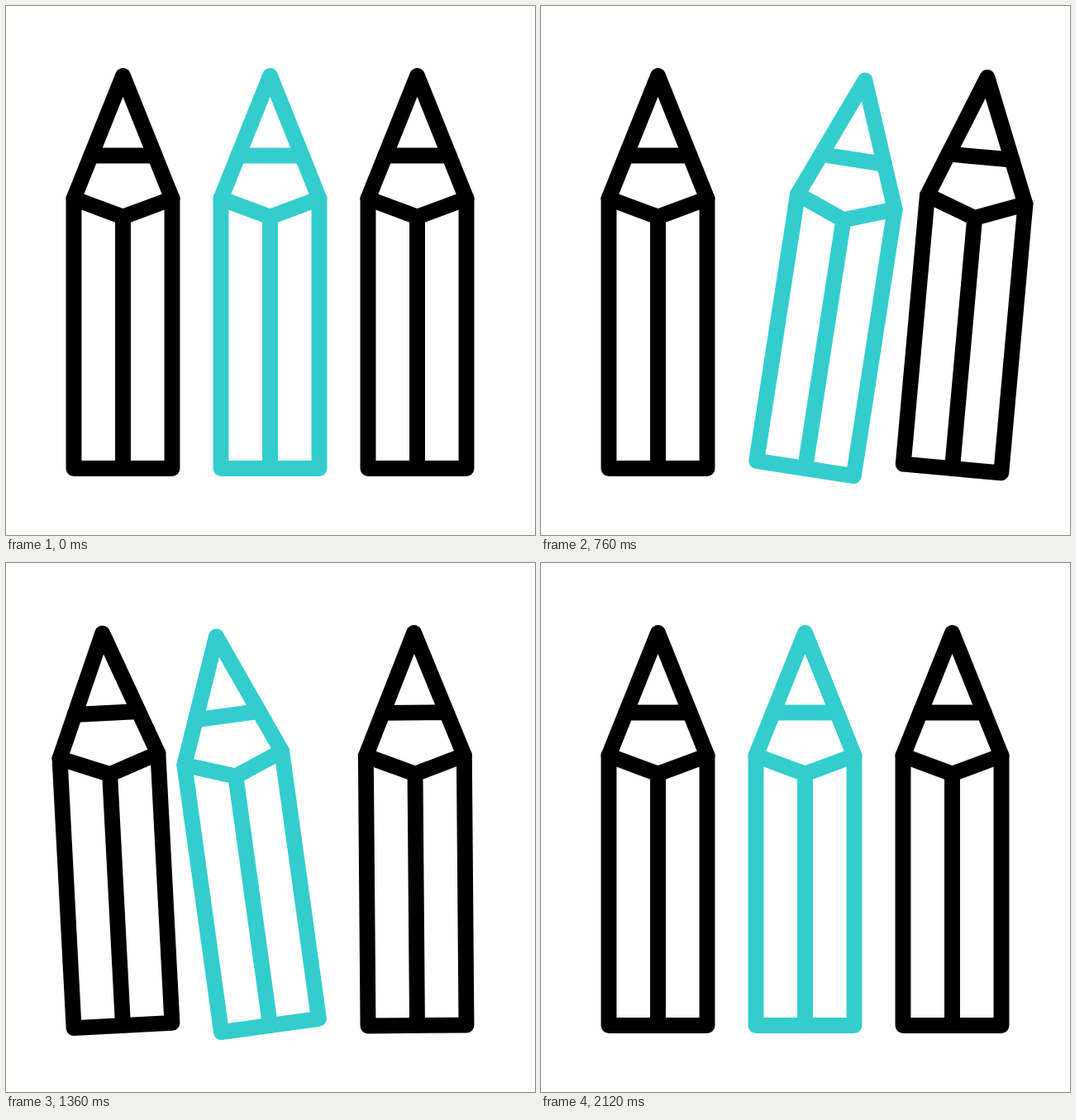
An HTML page for the animation above (2.28 s loop, 640x640 px).

```html
<!DOCTYPE html>
<html lang="en">
<head>
<meta charset="utf-8">
<title>Three pencils</title>
<style>
  html, body { margin: 0; width: 100%; height: 100%; overflow: hidden; background: #fff; }
  svg { display: block; width: 100%; height: 100%; }
</style>
</head>
<body>
<svg viewBox="0 0 640 640" fill="none" stroke-width="18.9" stroke-linecap="round" stroke-linejoin="round">
  <defs>
    <!-- The origin is the middle of the base, which is also the pivot. -->
    <g id="pencil">
      <path d="M-59.5 -326.5V0H59.5V-326.5L0 -475Z"/>
      <path d="M-59.5 -326.5L0 -304.3L59.5 -326.5M0 -304.3V0"/>
      <path d="M-38.7 -378.5H38.7"/>
    </g>
  </defs>
  <use id="left" href="#pencil" stroke="#000"/>
  <use id="middle" href="#pencil" stroke="#33cdcd"/>
  <use id="right" href="#pencil" stroke="#000"/>
</svg>
<script>
const STEP = 40;
const LOOP = 2280;
const BASE_Y = 559.5;
const CENTER_X = 319.5;
const SPACING = 178;

// Moments of the swing, in steps.
const hitRight = 5, turnRight = 18.2, hitLeft = 30, turnLeft = 42, clash = 47, rest = 53;
// Tilts in degrees: first contact, extra push, rebound.
const contact = 6.7, push = 3.2, rebound = 3.7;

// Constant-speed progress from 0 to 1 between two moments.
const ramp = (step, from, to) => Math.min(1, Math.max(0, (step - from) / (to - from)));

// Leans to a peak and back again.
const lean = (step, from, peak, to) => ramp(step, from, peak) - ramp(step, peak, to);

// The middle pencil swings fast until it hits a neighbour, then pushes on slowly.
function middleTilt(step) {
  const toRight = contact * ramp(step, 0, hitRight) + push * ramp(step, hitRight, turnRight);
  const toLeft = (2 * contact + push) * ramp(step, turnRight, hitLeft) + 1.1 * push * ramp(step, hitLeft, turnLeft);
  const back = (contact + 1.1 * push - rebound) * ramp(step, turnLeft, clash) + rebound * ramp(step, clash, rest);
  return toRight - toLeft + back;
}

// The neighbours tip away, fall back past upright and settle.
function rightTilt(step) {
  return 7.1 * lean(step, 0, 15.7, 27.6) - 1.4 * lean(step, 27.6, hitLeft, 36);
}

function leftTilt(step) {
  const upright = 44.7;
  return rebound * lean(step, upright, clash, rest) - 7.48 * lean(step, hitLeft, 40, upright);
}

function place(id, column, tilt) {
  const x = CENTER_X + column * SPACING;
  document.getElementById(id).setAttribute('transform', `translate(${x} ${BASE_Y}) rotate(${tilt.toFixed(3)})`);
}

function draw(time) {
  const step = Math.floor((time % LOOP) / STEP);
  place('left', -1, leftTilt(step));
  place('middle', 0, middleTilt(step));
  place('right', 1, rightTilt(step));
}

let start;
function tick(now) {
  start ??= now;
  draw(now - start);
  requestAnimationFrame(tick);
}
draw(0);
requestAnimationFrame(tick);
</script>
</body>
</html>
```
